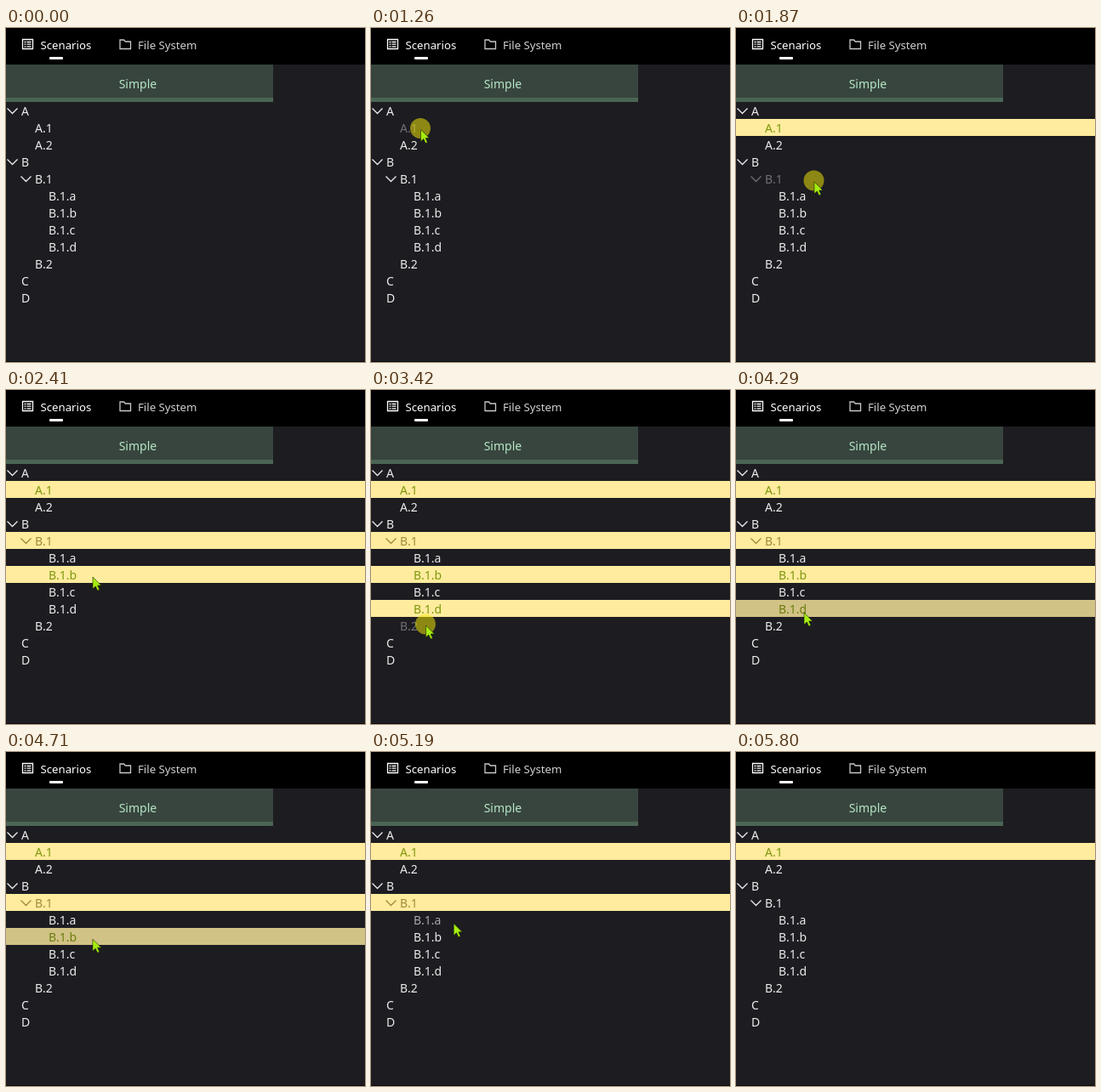
Animation, 422 px wide and 393 px high, one loop 6.07 s. Source, as an HTML page:

```html
<!DOCTYPE html>
<html lang="en">
<head>
<meta charset="utf-8">
<title>Tree selection</title>
<style>
  html, body { margin: 0; height: 100%; overflow: hidden; background: #1d1c21; }
  svg { display: block; font: 14px "Noto Sans", sans-serif; }
  .tab { font-size: 13.2px; }
  .line { fill: none; stroke: currentColor; stroke-width: 1.3; }
</style>
</head>
<body>
<svg width="422" height="393">
  <rect width="422" height="393" fill="#1d1c21"/>
  <rect width="422" height="43"/>
  <rect y="392" width="422" height="1" fill="#0c0c0e"/>
  <g class="tab" color="#fff" fill="#fff">
    <path class="line" d="M19.5 13.5h12v11h-12zM21.5 16.5h2m1 0h5m-8 2.7h2m1 0h5m-8 2.7h2m1 0h5"/>
    <text x="40.5" y="25">Scenarios</text>
    <rect x="51" y="34" width="16" height="3" rx="1"/>
  </g>
  <g class="tab" color="#c8c8c8" fill="#d0d0d0">
    <path class="line" d="M134 14h4.5l1.8 2h6.2v8.5H134z"/>
    <text x="155" y="25">File System</text>
  </g>
  <rect y="43" width="314" height="44" fill="#38453f"/>
  <rect y="82" width="314" height="5" fill="#4b6555"/>
  <text x="132.7" y="71" fill="#b5e6c3">Simple</text>
  <g id="tree"></g>
  <g id="pointer">
    <circle id="press" cx="-.5" cy="-1.5" r="12" fill="#f5ea08" fill-opacity=".52"/>
    <path d="M0 0V14L3.3 11 5.6 16 7.9 15 5.7 10H10Z" fill="#a6ec10" stroke="#1c2606" stroke-width=".6"/>
  </g>
</svg>
<script>
const LOOP = 6070, TOP = 87, ROW = 20, PRESS = 140;
const GREEN = '#7f960c', BROWN = '#a08b38', WHITE = '#ececec';
const labels = 'A A.1 A.2 B B.1 B.1.a B.1.b B.1.c B.1.d B.2 C D'.split(' ');
const isParent = i => (labels[i + 1] || '').startsWith(labels[i] + '.');
const rowAt = y => Math.floor((y - TOP) / ROW);

// The pointer enters, clicks at each stop just before leaving it, and exits
const stop = (x, y, arrive, leave) => ({ x, y, arrive, leave, row: rowAt(y) });
const clicks = [
  stop(58.5, 119.5, 1000, 1340),
  stop(92, 181, 1640, 2010),
  stop(102, 220, 2250, 2410),
  stop(93, 252, 2800, 2990),
  stop(64.5, 277, 3220, 3560),
  stop(65, 282, 3750, 4220),
  stop(80, 262, 4290, 4500),
  stop(102, 220, 4720, 5060),
  stop(92, 182, 5330, 5470)
];
const stops = [stop(258, 384, 450, 450), ...clicks, stop(250, 400, 5800, 5800)];

const [tree, pointer, press] = ['tree', 'pointer', 'press'].map(id => document.getElementById(id));

tree.innerHTML = labels.map((label, i) => {
  const x = 18 + 16 * (label.split('.').length - 1);
  const chevron = isParent(i) ? `<path class="line" d="M${x - 16.5} 7.5l6 6 6-6"/>` : '';
  return `<g transform="translate(0 ${TOP + ROW * i})"><rect width="422" height="${ROW}" fill="#ffec9e"/>
    ${chevron}<text x="${x}" y="16" fill="currentColor">${label}</text></g>`;
}).join('');
const rows = [...tree.children];

function pointerAt(t) {
  const next = stops.findIndex(s => s.arrive > t);
  if (next < 1) return null;
  const from = stops[next - 1], to = stops[next];
  const k = Math.max(0, (t - from.leave) / (to.arrive - from.leave));
  const ease = k * k * (3 - 2 * k);
  return { x: from.x + (to.x - from.x) * ease, y: from.y + (to.y - from.y) * ease };
}

function draw(t) {
  const tip = pointerAt(t);
  const hovered = tip ? rowAt(tip.y) : -1;
  const pressed = clicks.find(c => t >= c.leave - PRESS && t < c.leave);
  const done = clicks.filter(c => t >= c.leave);
  const latest = done.length ? done[done.length - 1].row : -1;

  rows.forEach((row, i) => {
    const selected = done.filter(c => c.row === i).length % 2 === 1;
    row.firstChild.style.display = selected ? '' : 'none';
    row.style.color = !selected ? WHITE : isParent(i) ? BROWN : GREEN;
    // a row just clicked stays bright until another is clicked
    row.style.opacity = pressed && pressed.row === i ? 0.4
      : i === hovered && i !== latest ? (selected ? 0.8 : 0.68) : 1;
  });

  pointer.style.display = tip ? '' : 'none';
  press.style.display = pressed ? '' : 'none';
  if (tip) pointer.setAttribute('transform', `translate(${tip.x} ${tip.y})`);
}

const start = performance.now();
function tick() {
  draw((performance.now() - start) % LOOP);
  requestAnimationFrame(tick);
}
tick();
</script>
</body>
</html>
```
